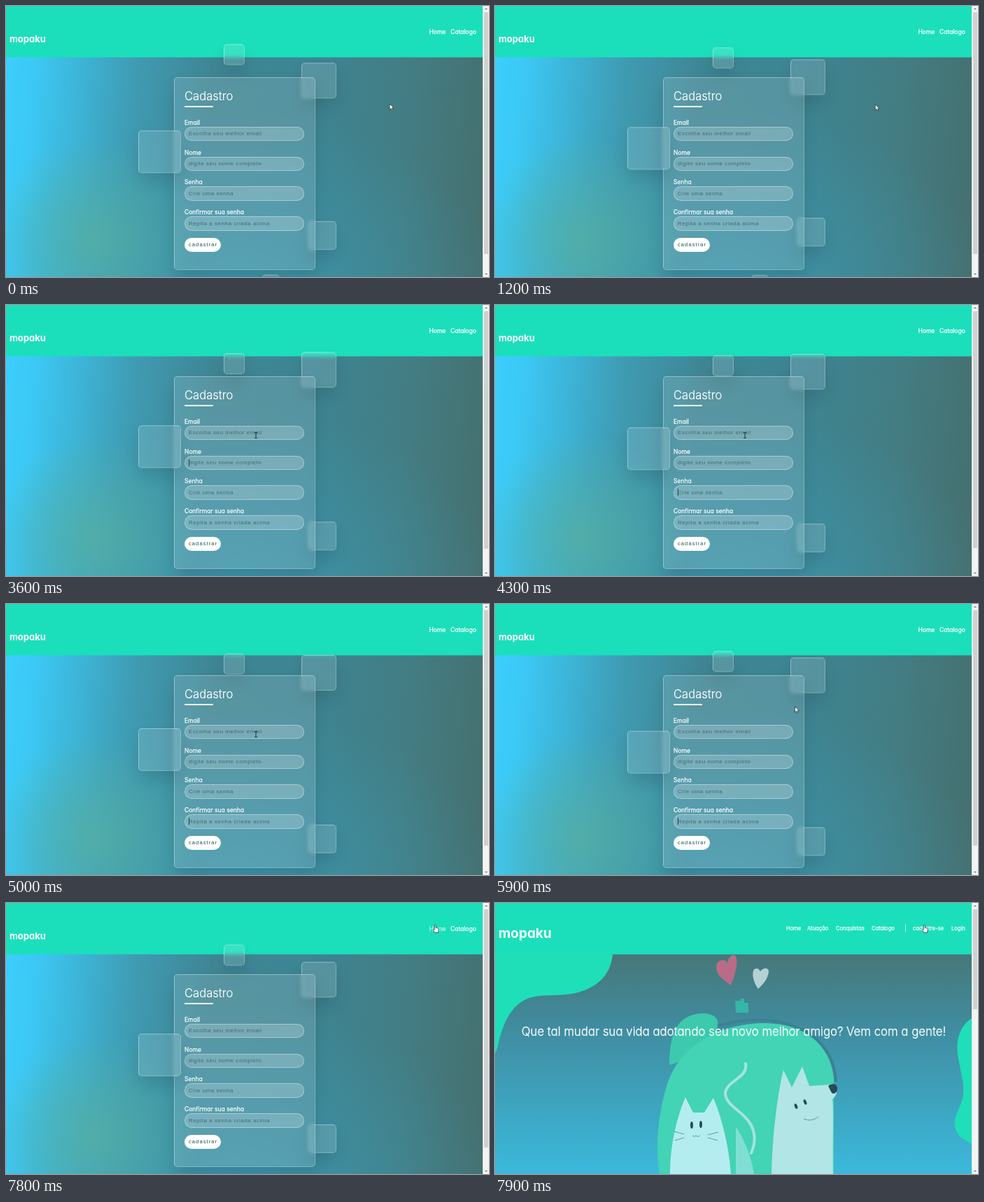
Write an HTML page that moves like this. It is 690x388 px and loops after 8 s.

```html
<!DOCTYPE html>
<html lang="pt">
<head>
<meta charset="utf-8">
<title>Cadastro</title>
<style>
html, body { margin: 0; width: 100%; height: 100%; overflow: hidden; }
body {
  position: relative; color: #fff; background: #3d8494;
  font-family: Inter, "Open Sans", sans-serif; font-feature-settings: "cv11";
}
div, span, svg { position: absolute; box-sizing: border-box; }
span { white-space: pre; line-height: 12px; }
.page { left: 0; top: 0; width: 682px; height: 388px; overflow: hidden; }
#form {
  background:
    radial-gradient(circle at 125px 335px, rgba(88,176,158,.72), rgba(88,176,158,0) 150px),
    radial-gradient(ellipse 380px 260px at 330px 410px, rgba(60,160,188,.6), rgba(60,160,188,0)),
    linear-gradient(95deg, #3ccfff 0, #3cc8f4 7%, #3db2d4 17%, #3f9bb2 27%, #3f8694 42%, #3d8593 62%, #437d83 82%, #456f6e 100%);
}
.bar { left: 0; top: 0; width: 682px; height: 73px; background: #1bdfbb; box-shadow: 0 1px rgba(27,223,187,.5); }
.logo { left: 5px; top: 41px; font-size: 13px; font-weight: 700; }
.nav { font-size: 8.5px; top: 31px; -webkit-text-stroke: .25px #fff; }
.glass {
  border: 1px solid rgba(255,255,255,.36);
  border-right-color: rgba(255,255,255,.24);
  border-bottom-color: rgba(255,255,255,.24);
  border-radius: 5px;
  background: rgba(255,255,255,.13);
  backdrop-filter: blur(2.5px);
  box-shadow: 0 12.6px 22.7px rgba(0,0,0,.11);
}
#card { left: 239.5px; top: 102px; width: 202px; height: 275.5px; z-index: 1; }
#fields { left: 255px; top: 0; z-index: 1; }
#fields h1 { position: absolute; margin: 0; top: 119px; font: 300 16.6px/20px Inter, sans-serif; -webkit-text-stroke: .2px #fff; }
.line { top: 143px; width: 41px; height: 2px; background: #fff; border-radius: 1px; }
.label { font-size: 8.5px; -webkit-text-stroke: .25px #fff; }
.input {
  width: 171px; height: 20.5px; border-radius: 10.5px;
  background: rgba(255,255,255,.2); border: 1px solid rgba(255,255,255,.35);
}
.hint { left: 6px; font: 8.08px/12px "Liberation Sans", Arial, sans-serif; letter-spacing: .505px; color: #3f6c74; }
#button {
  top: 332px; width: 52px; height: 20px; border-radius: 10px; background: #fff; color: #16554f;
  font: 7.6px/20px "Liberation Sans", Arial, sans-serif; letter-spacing: 1.05px; padding-left: 6px;
}
#caret { left: 6px; width: 1px; height: 10px; background: #27474c; }
#home { background: linear-gradient(#47787a 20%, #40899a 42%, #3f98af 60%, #3bb9dc); }
#home .nav { font-size: 7.6px; }
#headline {
  left: 0; width: 682px; top: 174px; text-align: center;
  font-size: 16.8px; font-weight: 300; line-height: 20px; -webkit-text-stroke: .3px #fff;
}
#scroll { left: 681px; top: 0; width: 9px; height: 388px; background: #f3f3f3; }
#thumb { left: 2px; top: 9px; width: 6px; background: #d0d0d0; }
#scroll i { position: absolute; left: 3px; border: 2px solid transparent; }
#cursor { left: 0; top: 0; width: 20px; height: 20px; overflow: visible; z-index: 9; }
</style>
</head>
<body>
<div class="page" id="form">
  <div class="bar"></div>
  <span class="logo">mopaku</span>
  <span class="nav" id="link" style="left:604.5px">Home</span>
  <span class="nav" style="left:635px">Catalogo</span>
  <div class="glass" id="card"></div>
  <div id="fields">
    <h1>Cadastro</h1>
    <div class="line"></div>
    <div id="button">cadastrar</div>
    <div id="caret"></div>
  </div>
</div>

<div class="page" id="home">
  <svg width="682" height="388" viewBox="0 0 682 388">
    <g fill="#1fdfb8">
      <path d="M0 73H168C166 100 150 118 122 127C94 136 66 128 44 138C18 150 8 184 4 206L0 216Z"/>
      <path d="M682 165C666 172 658 196 661 216C664 240 672 258 668 280C664 296 655 304 657 320C660 336 672 338 682 346Z"/>
    </g>
    <path d="M249 232C249 190 258 160 296 158C314 158 320 166 318 176C310 206 282 222 249 232Z" fill="#3cc9ae"/>
    <path d="M235 388C228 344 234 300 245 262C262 206 318 172 386 172C440 173 478 200 484 250L484 388Z" fill="#43d3b5"/>
    <path d="M318 176C390 154 482 172 487 256" fill="none" stroke="#3a8292" stroke-width="4"/>
    <path d="M343 140h8v-3h5v6h6v14h-18z" fill="#35b7a6"/>
    <path d="M337 118C327 110 316 104 316 92C316 82 327 78 332 86C333 76 343 70 345 79C347 92 341 106 337 118Z" fill="#b96c86"/>
    <path d="M376 123C370 114 367 105 369 97C371 92 377 93 379 98C383 92 391 92 391 98C390 109 383 116 376 123Z" fill="#b5d2d2"/>
    <path d="M358 230C362 250 332 254 329 271C328 288 350 296 362 312C374 328 372 344 366 358" fill="none" stroke="#a5e4dc" stroke-width="4" stroke-linecap="round"/>
    <path d="M344 388V320C356 338 366 362 370 388Z" fill="#7fdfd2"/>
    <path d="M250 388C250 346 260 306 272 278L283 300H299L312 279C324 308 334 346 337 388Z" fill="#b4edf0"/>
    <path d="M395 388C396 340 402 280 412 239L424 264L439 234L449 262L480 260C491 264 490 274 482 281C484 300 482 340 483 388Z" fill="#b2e5e6"/>
    <path d="M476 262C482 257 490 259 489 267C488 273 482 275 480 270Z" fill="#28495a"/>
    <g fill="#28495a">
      <ellipse cx="281" cy="318" rx="2" ry="5"/><ellipse cx="294" cy="317" rx="2" ry="5"/>
      <ellipse cx="430" cy="291" rx="2" ry="4" transform="rotate(-20 430 291)"/>
      <ellipse cx="443" cy="285" rx="2" ry="4" transform="rotate(-20 443 285)"/>
    </g>
    <path d="M441 309Q452 314 462 306M282 333q3 3 5 0q3 3 6 0M270 331l-14 -4M270 336l-13 4M304 332l15 -4M304 336l14 4" fill="none" stroke="#5f9aa4"/>
  </svg>
  <div class="bar"></div>
  <span class="logo" style="top:38px;font-size:19px">mopaku</span>
  <span class="nav" style="left:416px">Home</span>
  <span class="nav" style="left:446px">Atuação</span>
  <span class="nav" style="left:487px">Conquistas</span>
  <span class="nav" style="left:538px">Catalogo</span>
  <div style="left:586px;top:30px;width:1px;height:12px;background:#b9f5e8"></div>
  <span class="nav" style="left:597px">cadastre-se</span>
  <span class="nav" style="left:652px">Login</span>
  <span id="headline">Que tal mudar sua vida adotando seu novo melhor amigo? Vem com a gente!</span>
</div>

<div id="scroll">
  <div id="thumb"></div>
  <i style="top:1px;border-bottom-color:#777"></i>
  <i style="top:383px;border-top-color:#777"></i>
</div>
<svg id="cursor">
  <path id="arrow" d="M0 0V8.4L2 6.6L3.3 9.5L4.6 8.9L3.4 6.1H5.9Z" fill="#fff" stroke="#222" stroke-width=".7"/>
  <path id="beam" d="M-2 -4H-.5L0 -3.6L.5 -4H2M0 -3.6V3.6M-2 4H-.5L0 3.6L.5 4H2" fill="none" stroke="#1c2b30" stroke-width="1"/>
  <path id="hand" d="M-1.6 -5.5Q-.6 -6.4 .2 -5.4V-1.6L3.4 -.8Q4.4 -.4 4.2 .8L3.5 5.5H-1.2L-3.8 1.6Q-3.8 .2 -2.6 .6L-1.6 1.4Z" fill="#fff" stroke="#222" stroke-width=".7"/>
</svg>

<script>
const $ = id => document.getElementById(id);
const add = (parent, cls, css, text = '') => {
  const el = document.createElement('div');
  el.className = cls;
  el.style.cssText = css;
  el.textContent = text;
  return parent.appendChild(el);
};

const fields = [
  ['Email', 'Escolha seu melhor email'],
  ['Nome', 'digite seu nome completo'],
  ['Senha', 'Crie uma senha'],
  ['Confirmar sua senha', 'Repita a senha criada acima']
];
const fieldTop = i => 172.6 + i * 42.9;
fields.forEach(([label, hint], i) => {
  const y = fieldTop(i), nowrap = 'white-space:nowrap;line-height:12px;top:';
  add($('fields'), 'label', nowrap + (y - 12) + 'px', label);
  add($('fields'), 'input', `top:${y}px`);
  add($('fields'), 'hint', nowrap + (y + 4.3) + 'px', hint);
});
$('fields').append($('caret'));

// left, highest top, size, layer
const squares = [
  [421.5, 67, 50.5, 0], [189, 168, 61, 2], [431.5, 301.9, 40.5, 0],
  [366, 382.4, 25, 0], [310.5, 52.6, 30.3, 0]
].map(([x, top, size, z]) => ({
  top, el: add($('form'), 'glass', `left:${x}px;top:0;width:${size}px;height:${size}px;z-index:${z}`)
}));

// 10 s linear bobbing, each square one second ahead of the previous
const bob = (t, i) => {
  const p = ((t - 3.53 + i + 10) % 10) / 5;
  return 20.2 * (p < 1 ? p : 2 - p);
};

// time, x, y
const path = [
  [0, 548, 140], [1.1, 548, 140], [2.3, 304, 184], [2.8, 304, 184], [3.4, 357, 186.5],
  [5.5, 357, 186.5], [6.6, 595, 54], [6.7, 595, 54], [7.1, 614, 37], [8, 614, 37]
];
const pointer = t => {
  const k = path.findIndex(p => p[0] > t), [t0, x0, y0] = path[k - 1], [t1, x1, y1] = path[k];
  const u = (t - t0) / (t1 - t0), e = u * u * (3 - 2 * u);
  return [x0 + (x1 - x0) * e, y0 + (y1 - y0) * e];
};

const focusTimes = [2.6, 3.5, 4.1, 4.6], blurTime = 7.5;
const show = (id, on) => $(id).style.display = on ? '' : 'none';

function draw(t) {
  const home = t >= 7.9;
  show('form', !home);
  show('home', home);

  squares.forEach(({ top, el }, i) => el.style.transform = `translateY(${top + bob(t, i)}px)`);
  $('thumb').style.height = (home ? 143 : 346 - .55 * (bob(t, 3) - 2)) + 'px';

  const [x, y] = pointer(t);
  const onLink = x > 604 && y < 44;
  const onField = x > 255 && x < 426 && fields.some((_, i) => y > fieldTop(i) && y < fieldTop(i) + 20.5);
  $('cursor').style.transform = `translate(${x}px,${y}px)`;
  show('hand', onLink);
  show('beam', onField);
  show('arrow', !onLink && !onField);
  $('link').style.opacity = onLink ? .7 : 1;

  const focus = focusTimes.filter(f => f <= t).length - 1;
  show('caret', focus >= 0 && t < blurTime && (t - focusTimes[focus] + .001) % 1 < .5);
  $('caret').style.top = fieldTop(Math.max(focus, 0)) + 5 + 'px';
}

const start = performance.now();
function tick() {
  const ms = (performance.now() - start) % 8000;
  draw(Math.floor(ms / 100) / 10);
  requestAnimationFrame(tick);
}
tick();
</script>
</body>
</html>
```
